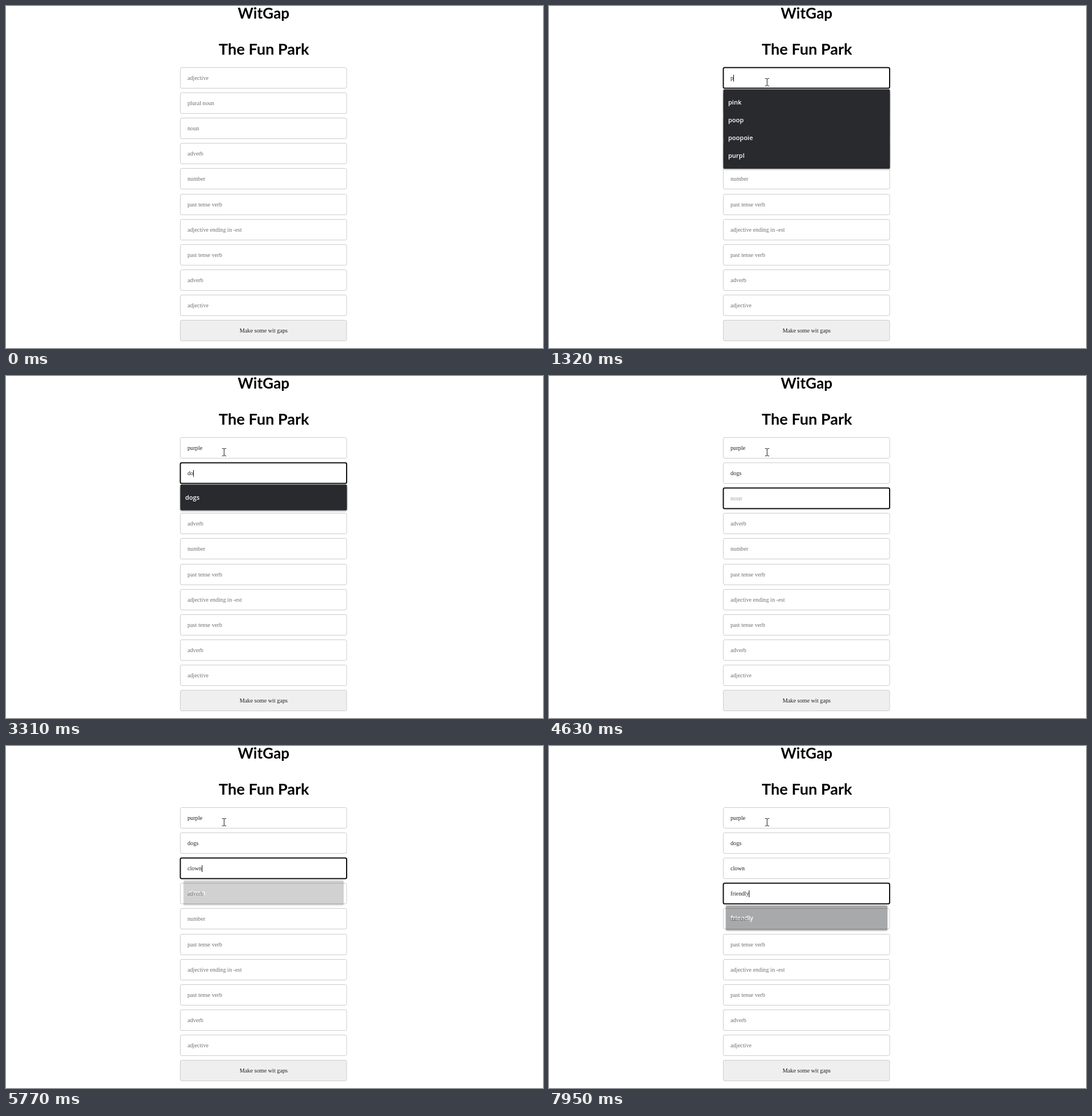
Write an HTML page that moves like this. It is 938 px wide and 597 px high and loops after 8000 ms.

```html
<!DOCTYPE html>
<html lang="en">
<head>
<meta charset="utf-8">
<title>The Fun Park</title>
<style>
  html, body { margin: 0; width: 100%; height: 100%; overflow: hidden; background: #fff; }
  svg { display: block; }
  text { white-space: pre; }
  .title { font: 700 26px Lato, sans-serif; text-anchor: middle; }
  .label { font: 10.2px "Liberation Serif", serif; fill: #222; }
  .empty { fill: #707070; }
  .focus.empty { fill: #a0a0a0; }
  .box { fill: #fff; stroke: #ccc; }
  .box.focus { stroke: #101014; stroke-width: 2; }
  .button { fill: #efefef; }
  .popup rect { fill: #292a2e; filter: drop-shadow(0 1px 1.5px rgba(0, 0, 0, .45)); }
  .popup text { font: 600 11px "Open Sans", sans-serif; fill: #fff; }
</style>
</head>
<body>
<svg width="938" height="597" viewBox="0 0 938 597">
  <text class="title" x="450" y="21.5">WitGap</text>
  <text class="title" x="450.5" y="85" style="font-size:27px">The Fun Park</text>
  <g id="form"></g>
  <rect id="caret" width="1" height="12" fill="#111"/>
  <g id="popup" class="popup"></g>
  <path id="arrow" d="M.5 .5V15.5L4 12.3L6.3 17.8L8.7 16.8L6.4 11.5H11.2Z" fill="#fff" stroke="#000"/>
  <path id="beam" d="M-3.5 -6.5H-1.5L0 -5.5L1.5 -6.5H3.5M0 -5.5V5.5M-3.5 6.5H-1.5L0 5.5L1.5 6.5H3.5" fill="none" stroke="#111"/>
</svg>
<script>
const LOOP = 8000, BLINK = 530, PITCH = 44.1, ROW = 31.1;
const hints = ['adjective', 'plural noun', 'noun', 'adverb', 'number', 'past tense verb',
  'adjective ending in -est', 'past tense verb', 'adverb', 'adjective'];

// [time, field, value]
const typing = [
  [660, 0, ''], [1320, 0, 'p'], [1520, 0, 'pu'], [1720, 0, 'pur'], [1850, 0, 'purp'],
  [1980, 0, 'purpl'], [2180, 0, 'purple'],
  [2510, 1, ''], [3170, 1, 'd'], [3310, 1, 'do'], [3370, 1, 'dog'], [3640, 1, 'dogs'],
  [4100, 2, ''], [5100, 2, 'c'], [5300, 2, 'cl'], [5430, 2, 'clo'], [5630, 2, 'clow'], [5700, 2, 'clown'],
  [5900, 3, ''], [6830, 3, 'f'], [7020, 3, 'fr'], [7160, 3, 'fri'], [7290, 3, 'frie'],
  [7420, 3, 'frien'], [7550, 3, 'friend'], [7620, 3, 'friendl'], [7890, 3, 'friendly']
];

// [time, suggestions, fade-out progress]
const lists = [
  [1320, 'pink poop poopoie purpl', 0], [1520, 'purpl', 0], [1980, 'purpl', .28], [2050, 'purpl', .73], [2110, '', 0],
  [3170, 'dogs', 0], [3640, 'dogs', .2], [3700, 'dogs', .65], [3770, '', 0],
  [5100, 'cat clown', 0], [5300, 'clown', 0], [5700, 'clown', .34], [5770, 'clown', .79], [5830, '', 0],
  [6830, 'friendly', 0], [7890, 'friendly', .15], [7950, 'friendly', .6]
];

const $ = id => document.getElementById(id);
const make = (tag, attrs, parent) => {
  const el = document.createElementNS('http://www.w3.org/2000/svg', tag);
  for (const key in attrs) el.setAttribute(key, attrs[key]);
  return parent.appendChild(el);
};
const fieldTop = i => Math.round(107 + i * PITCH) + .5;
const makeBox = (i, cls) =>
  make('rect', { x: 304.5, y: fieldTop(i), width: 290.5, height: 36, rx: 2.5, class: cls }, $('form'));
const makeLabel = (i, attrs) => make('text', { y: fieldTop(i) + 21.5, ...attrs }, $('form'));

const fields = hints.map((hint, i) => ({ hint, rect: makeBox(i, 'box'), text: makeLabel(i, { x: 317 }) }));
makeBox(10, 'box button');
makeLabel(10, { x: 450, class: 'label', 'text-anchor': 'middle' }).textContent = 'Make some wit gaps';

function drawFields(t) {
  const done = typing.filter(step => step[0] <= t);
  const [since, active, value] = done[done.length - 1] || [0, -1, ''];
  const values = {};
  done.forEach(([, field, text]) => values[field] = text);
  fields.forEach(({ hint, rect, text }, i) => {
    const focus = i === active ? ' focus' : '';
    rect.setAttribute('class', 'box' + focus);
    text.setAttribute('class', 'label' + focus + (values[i] ? '' : ' empty'));
    text.textContent = values[i] || hint;
  });
  const on = active >= 0 && (t - since) % (2 * BLINK) < BLINK;
  $('caret').style.display = on ? '' : 'none';
  if (on) {
    const width = value ? fields[active].text.getComputedTextLength() : 1;
    $('caret').setAttribute('x', Math.round(317 + width));
    $('caret').setAttribute('y', fieldTop(active) + 12.5);
  }
  return active;
}

function drawPopup(t, active) {
  const popup = $('popup');
  const shown = lists.filter(step => step[0] <= t);
  const [, words, fade] = shown[shown.length - 1] || [0, '', 0];
  popup.replaceChildren();
  if (!words) return;
  const items = words.split(' '), y = fieldTop(active) + 38, height = 14 + ROW * items.length;
  make('rect', { x: 304.5, y, width: 291, height, rx: 2 }, popup);
  items.forEach((word, i) => {
    make('text', { x: 313, y: y + 26.5 + i * ROW }, popup).textContent = word;
  });
  const cy = y + height / 2;
  popup.setAttribute('opacity', 1 - fade);
  popup.setAttribute('transform', `translate(450 ${cy}) scale(${1 - fade * .05}) translate(-450 ${-cy})`);
}

function drawPointer(t) {
  const step = Math.floor((t - 120) / 66);
  const left = (1 - Math.min(Math.max(step, 0) / 8, 1)) ** 2;
  const x = Math.round(381 + 353 * left), y = Math.round(133 + 324 * left);
  const overField = x < 596 && (y - 107) % PITCH < 37;
  const show = (id, visible) => {
    $(id).style.display = visible ? '' : 'none';
    $(id).setAttribute('transform', `translate(${x} ${y})`);
  };
  show('arrow', step >= 0 && !overField);
  show('beam', step >= 0 && overField);
}

function draw() {
  const t = performance.now() % LOOP;
  drawPopup(t, drawFields(t));
  drawPointer(t);
  requestAnimationFrame(draw);
}
draw();
</script>
</body>
</html>
```
